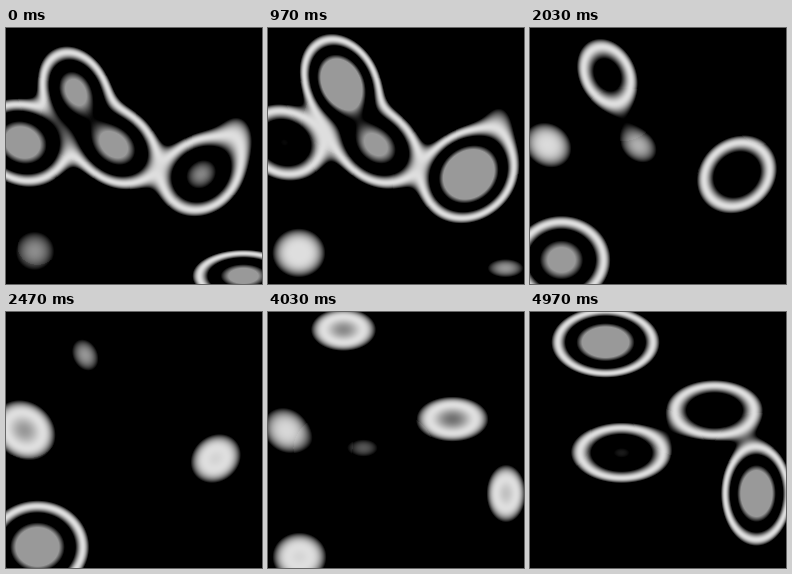
Write an HTML page with a canvas that moves like this. It is 256 by 256 pixels and loops after 5.01 s.

```html
<!DOCTYPE html>
<html lang="en">
<head>
<meta charset="utf-8">
<title>Drifting contours</title>
<style>
  html, body { margin: 0; width: 100%; height: 100%; overflow: hidden; background: #000; }
  canvas { display: block; width: 100vw; height: 100vh; }
</style>
</head>
<body>
<canvas id="stage" width="256" height="256"></canvas>
<script>
const SIZE = 256, LOOP = 5.01, FPS = 30;
const LIFE = 0.82;   // seconds in which a hill sinks by one level from its summit
const BLEND = 0.6;   // lower values melt neighbouring hills together more
const FLOOR = -6;    // heights below this add nothing visible

// Every hill is a paraboloid in space and time: highest at time `at`, drifting in px/s.
const hills = [
  { at: 0.78, peak: 4.7, x: 72, y: 56, rx: 24, ry: 18, tilt: 63, vx: 4, vy: -8 },
  { at: 0.45, peak: 4.15, x: 108, y: 117, rx: 26, ry: 20, tilt: 38 },
  { at: 0.15, peak: 4.1, x: 16, y: 114, rx: 25, ry: 21, tilt: 25 },
  { at: 0.92, peak: 4.75, x: 200, y: 146, rx: 24.5, ry: 21, tilt: -40, vx: 6 },
  { at: 0.4, peak: 0.6, x: 231, y: 100, rx: 18, ry: 24, vy: -15 },
  { at: -0.7, peak: 4.6, x: 237, y: 253, rx: 26, ry: 13.3, vy: -8 },
  { at: -0.1, peak: 0.4, x: 28, y: 223, rx: 30, ry: 30 },
  { at: 2.55, peak: 4.3, x: 31, y: 235, rx: 25, ry: 22.5, vy: 6.5 },
  { at: 3.1, peak: 2.05, x: 18, y: 118, rx: 27, ry: 23, tilt: 40 },
  { at: 4.95, peak: 3, x: 184, y: 98, rx: 28, ry: 17.5, vy: -9 },
  { at: 5.45, peak: 4.7, x: 75, y: 36, rx: 26, ry: 17, vy: 13 },
  { at: 5.5, peak: 3.6, x: 89, y: 143, rx: 28, ry: 17, vx: -4, vy: 5 },
  { at: 5.55, peak: 4.9, x: 219, y: 181, rx: 17, ry: 25, vx: -12 }
];

function pose({ at, peak, x, y, rx, ry, tilt = 0, vx = 0, vy = 0 }, time) {
  const age = time - at, angle = tilt * Math.PI / 180;
  const cos = Math.cos(angle), sin = Math.sin(angle);
  return {
    top: peak - (age / LIFE) ** 2,
    x: x + vx * age, y: y + vy * age,
    ux: cos / rx, uy: sin / rx, wx: -sin / ry, wy: cos / ry
  };
}

// Smooth maximum of all hills
function level(poses, x, y) {
  let sum = 0;
  for (const p of poses) {
    const dx = x - p.x, dy = y - p.y;
    const u = dx * p.ux + dy * p.uy, w = dx * p.wx + dy * p.wy;
    const height = p.top - u * u - w * w;
    if (height > FLOOR) sum += Math.exp(BLEND * height);
  }
  return sum > 1 ? Math.log(sum) / BLEND : 0;
}

// Black, bright ring, black, then a flat grey summit
function shade(h) {
  if (h < 2) return 222 * Math.sin(h * Math.PI / 2);
  return 153 * Math.min(1, Math.max(0, (h - 3.1) / 0.45));
}

const context = document.getElementById("stage").getContext("2d");
const picture = context.createImageData(SIZE, SIZE);
const pixels = new Uint32Array(picture.data.buffer);

function draw(time) {
  const poses = hills.map(hill => pose(hill, time)).filter(p => p.top > FLOOR);
  for (let y = 0, n = 0; y < SIZE; y++) {
    for (let x = 0; x < SIZE; x++, n++) {
      const grey = Math.round(shade(level(poses, x, y)));
      pixels[n] = 0xff000000 | grey * 0x010101;
    }
  }
  context.putImageData(picture, 0, 0);
}

const start = performance.now();
let shown = -1;
function tick() {
  const time = (performance.now() - start) / 1000 % LOOP;
  const step = Math.floor(time * FPS);
  if (step !== shown) {
    shown = step;
    draw(step / FPS);
  }
  requestAnimationFrame(tick);
}
tick();
</script>
</body>
</html>
```
